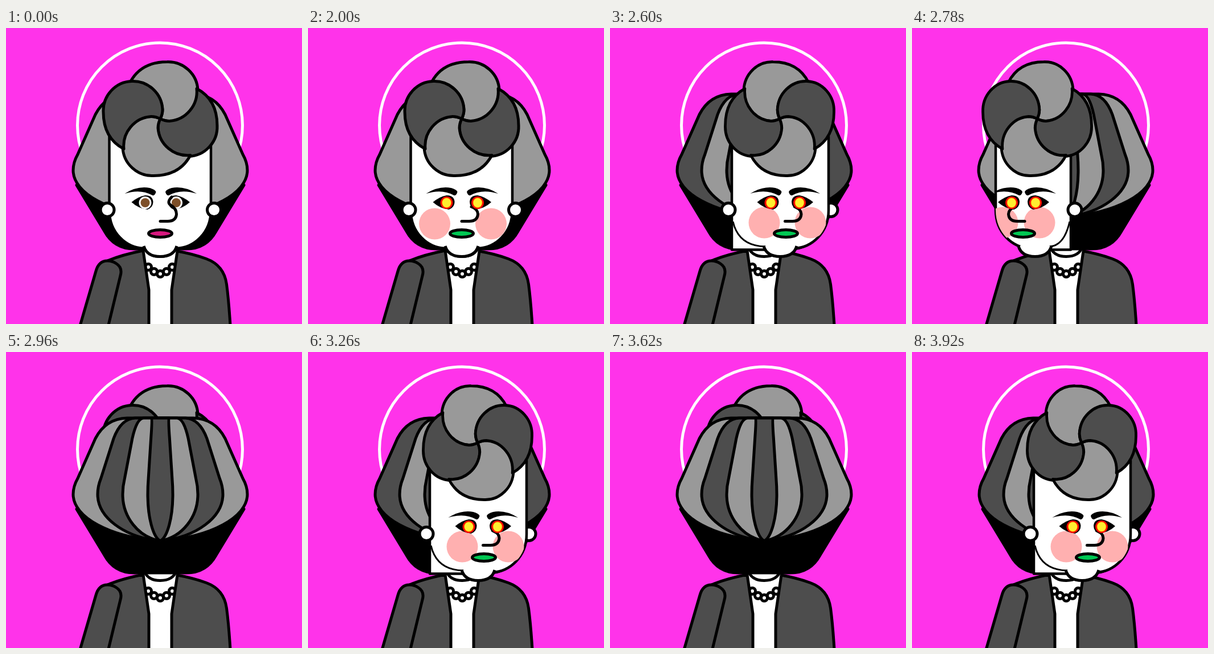
These frames come from a looping animation (520 by 520 pixels, 3.98 s). An HTML page:

```html
<!DOCTYPE html>
<html>
<head>
<meta charset="utf-8">
<style>
html, body { margin: 0; width: 100%; height: 100%; overflow: hidden; background: #ff33ea }
svg { display: block; width: 100vw; height: 100vh }
</style>
</head>
<body>
<svg viewBox="0 0 520 520" stroke-width="5" stroke-linejoin="round">
  <circle cx="270.5" cy="171" r="145" fill="none" stroke="#fff"/>
  <g stroke="#000">
    <path d="M240 380H302V394L291 460V530H251V460L241 394z" fill="#fff" stroke="none"/>
    <path d="M243 385Q249 401.500 271 401.500Q293 401.500 299 385" fill="none"/>
    <g id="pearls" fill="#fff"></g>
    <g fill="#4d4d4d">
      <path d="M241 391Q205 398 178 409V530H251V460z"/>
      <path d="M301 392Q329 397 352 405.500Q383 417 387.500 450Q391.500 480 394.500 530H291V460z"/>
      <path d="M128 530L158 427Q163 409 178 409Q187 409 194 414Q205 421 201 435L178 530z"/>
    </g>
    <g id="head"></g>
  </g>
</svg>
<script>
const LIGHT = '#999', DARK = '#4d4d4d';
const head = document.getElementById('head');

const path = (d, fill = 'none', extra = '') => `<path d="${d}" fill="${fill}" ${extra}/>`;
const oval = (x, y, rx, ry, fill, extra = '') =>
  `<ellipse cx="${x}" cy="${y}" rx="${rx}" ry="${ry}" fill="${fill}" ${extra}/>`;
const plain = 'stroke="none"';

document.getElementById('pearls').innerHTML =
  [[250, 420], [292, 420], [260, 428], [282, 428], [271, 432]]
    .map(([x, y]) => oval(x, y, 5.5, 5.5, '#fff')).join('');

// Head poses from front (0) to back (6), in steps of 30 degrees.
const poses = [
  { curl: 0, l: 181.5, r: 360, eyes: [244.5, 299], nose: 0, mouth: 271, chin: 271, cheeks: [223.5, 322.5], ears: [178, 365.5] },
  { curl: 27, l: 214, r: 384, eyes: [282.5, 333], nose: 36.5, mouth: 309, chin: 299, cheeks: [271, 352], ears: [208, 388] },
  { curl: 50, l: 262, r: 394, eyes: [324, 366], nose: 72, mouth: 346, chin: 325, cheeks: [317, 382], ears: [255] },
  { curl: 66, l: 310, r: 394, eyes: [362], nose: 108, mouth: 383, chin: 346, cheeks: [358], ears: [303] },
  { curl: 65, l: 357, r: 390, eyes: [], nose: 108, cheeks: [386], ears: [350] },
  { curl: 40 },
  { curl: 0 }
];

function hairShape(s) {
  const half = m => {
    const x = w => 271 + m * w * s;
    return [271 + m * (8 + 50 * s), x(96), x(114), x(145), x(153), x(90)];
  };
  const [a, b, c, d, e, f] = half(-1), [A, B, C, D, E, F] = half(1);
  return `M${a} 116Q${b} 117 ${c} 152L${d} 222Q${e} 236 ${e} 250C${e} 290 ${f} 325 271 332` +
    `C${F} 325 ${E} 290 ${E} 250Q${E} 236 ${D} 222L${C} 152Q${B} 117 ${A} 116z`;
}

function shell(n) {
  const sizes = n ? [153, 110, 66, 22] : [153];
  return path('M124 276L173 357Q190 388 225 388H317Q352 388 369 357L418 276z', '#000') +
    sizes.map((w, j) => path(hairShape(w / 153), (3 - j + n) % 2 ? LIGHT : DARK)).join('');
}

// Four equal lobes turned about one centre, each edge shared with the next.
function curls(x, flip) {
  const lobe = 'M0 0Q8 4 16 4A52 52 0 0 0 12 -100Q-34 -100 -53 -64A52 52 0 0 1 4 -16Q4 -8 0 0z';
  const lobes = [0, 90, 180, 270]
    .map((a, i) => path(lobe, i % 2 ? DARK : LIGHT, `transform="rotate(${a})"`)).join('');
  return `<g transform="translate(${271 + x} 159.500) scale(${flip ? -0.955 : 1} 1)">${lobes}</g>`;
}

function eye(x, side, evil) {
  const lid = path('M-24 -1Q-12 -11 0 -13Q13 -13 14 -2Q14 8 4 12Q-12 10 -24 -1', '#000', plain);
  const brow = path('M-36 -16Q-14 -30 8 -26Q18 -23 19 -19Q17 -12 13 -13Q-8 -25 -36 -16', '#000', plain);
  const iris = evil
    ? oval(0, 0, 11, 11, '#f00', plain) + oval(0, 0, 8.5, 9, '#ff8c00', plain) + oval(0, 0, 7.5, 8, '#ffee30', plain)
    : oval(0, 0, 11, 11, '#fff', plain) + oval(0, 0, 8, 8, '#7d4f28', plain);
  return `<g transform="translate(${x} 307) scale(${side} 1)">${lid}${brow}${iris}</g>`;
}

function face(n, p, evil) {
  const { l, r } = p, w = Math.min(60, r - l);
  const right = `C${r - w / 2} 386 ${r} 360 ${r} 320V190`;
  const outline = n
    ? `M${l} 190V389.500H${r - w}M${r - w} 387${right}`
    : `M${l} 190V320C${l} 360 ${l + w / 2} 386 ${l + w} 387H${r - w}${right}`;
  const area = n ? `M${l} 190V389.500H${r - w}V387${right}z` : outline;
  const ears = p.ears.map(x => oval(x, 319.5, 12, 12, '#fff'));

  const bridge = evil ? 'M288 314Q299 318 ' : 'M291 297Q282 306 289 311Q299.500 317 ';
  const nose = n < 3
    ? path(bridge + '299.500 327Q298.500 339.500 284 339.500H271', 'none',
      `stroke-linecap="round" transform="translate(${p.nose} 0)"`)
    : path(`M${r} 303Q${r + 24} 325 ${r + 22} 333Q${r + 18} 341 ${r} 341`, '#fff');
  const eyes = p.eyes.map((x, i) => eye(x, i ? -1 : 1, evil)).join('');
  const cheeks = evil ? p.cheeks.map(x => oval(x, n ? 342 : 344, 27.5, 27.5, '#ffb0b0', plain)).join('') : '';
  const mouth = p.mouth
    ? oval(p.mouth, 361, n < 3 ? 20.5 : 13, 6.5, evil ? '#00c853' : '#d8187f') : '';
  const c = p.chin;
  const jaw = n && c ? path(`M${l + 2} 340Q${l + 12} 384 ${c - 24} 384`, 'none', 'stroke-width="3"') : '';
  const chin = c
    ? path(`M${c - 29} 383Q${c - 24} 401.500 ${c} 401.500Q${c + 24} 401.500 ${c + 29} 383`, '#fff') +
      path(`M${c - 26} 382H${c + 26}L${c + 20} 390H${c - 20}z`, '#fff', plain) : '';

  return `<clipPath id="skin">${path(area)}</clipPath>` + (n ? ears[1] || '' : '') +
    path(area, '#fff', plain) + path(outline, 'none', 'stroke-width="4.500"') + jaw + chin +
    `<g clip-path="url(#skin)">${cheeks}${evil && n < 3 ? nose + eyes : eyes}${mouth}</g>` +
    (evil && n < 3 ? '' : nose) + ears[0] + (n ? '' : ears[1]);
}

function drawHead(view, evil) {
  const n = Math.min(view, 12 - view), p = poses[n];
  const quiff = curls(p.curl, n % 6);
  const front = p.l ? face(n, p, evil) : '';
  const facing = `<g transform="translate(${evil && !n ? -1 : 0} 0)">${front}${n < 4 ? quiff : ''}</g>`;
  const turn = view > 0 && view < 6 ? 'matrix(-1 0 0 1 541 0)' : '';
  return `<g transform="${turn}">${n > 3 ? quiff : ''}${shell(n)}${facing}</g>`;
}

let shown = '';
function tick() {
  const t = performance.now() % 3980;
  const evil = t >= 2000;
  const step = evil ? Math.floor((t - 2000) / 60) % 11 : 0;
  const view = step < 5 ? step : step + 1;
  const key = view + ' ' + evil;
  if (key !== shown) {
    head.innerHTML = drawHead(view, evil);
    shown = key;
  }
  requestAnimationFrame(tick);
}
tick();
</script>
</body>
</html>
```
